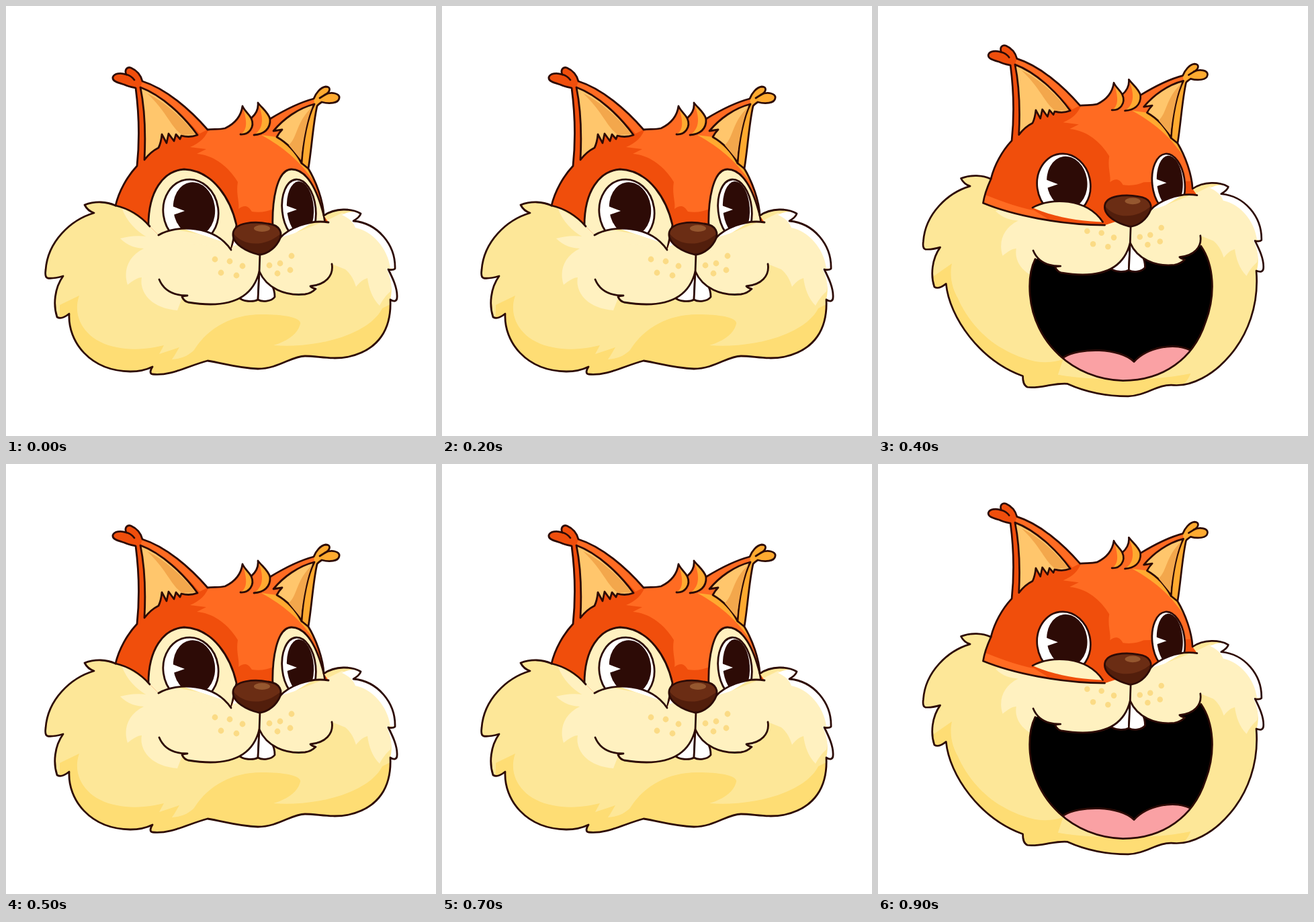
Write an HTML page that moves like this. It is 640x640 px and loops after 1000 ms.

```html
<!DOCTYPE html>
<html lang="en">
<head>
<meta charset="utf-8">
<title>Laughing squirrel</title>
<style>
  html, body { margin: 0; width: 100%; height: 100%; overflow: hidden; background: #fff; }
  svg { display: block; width: 100vw; height: 100vh; }
</style>
</head>
<body>
<svg id="stage" viewBox="0 0 640 640"></svg>
<script>
const INK = '#2d0b06', CREAM = '#fde798', PALE = '#fff1c0', GOLD = '#fedd74',
      RUST = '#f04e0c', ORANGE = '#ff6b22', AMBER = '#ffaa30', TAN = '#ffc66c', SHADE = '#f3a74c';

const fill = (d, color) => `<path d="${d}" fill="${color}"/>`;
const line = d => `<path d="${d}" fill="none" stroke="${INK}"/>`;
const both = (d, color) => `<path d="${d}" fill="${color}" stroke="${INK}"/>`;
const oval = (x, y, rx, ry, color, turn = 0, stroke = 'none') =>
  `<ellipse cx="${x}" cy="${y}" rx="${rx}" ry="${ry}" fill="${color}" stroke="${stroke}" transform="rotate(${turn} ${x} ${y})"/>`;
const clipped = (id, d, inner) =>
  `<clipPath id="${id}"><path d="${d}"/></clipPath><g clip-path="url(#${id})">${inner}</g>`;

const headTop = `M163,297 C168,276 180,254 195,238 C199,200 198,160 193,122
  C188,121 182,120 176,117 C166,114 158,112 159,106 C161,100 171,99 179,102
  C176,95 180,90 186,92 C195,96 201,104 203,112 C238,123 274,154 300,184
  C310,183 317,184 326,182 C343,174 350,163 352,149 C355,156 361,160 365,167
  C373,160 376,153 375,144 C381,152 390,158 393,168 C411,157 435,144 458,138
  C461,130 468,121 476,120 C484,120 483,128 475,132 C484,127 497,130 496,137
  C495,145 481,146 470,143 C467,145 464,147 463,149 C457,175 455,212 450,242
  C462,262 472,290 473,312`;
const leftLid = 'M227,341 C255,325 310,326 335,363';
const rightLid = 'M480,322 C450,317 420,332 408,345';
const jaw = 'M338,368 C268,367 197,353 151,334 C153,320 158,308 163,297';
const brow = 'M214,328 C200,312 185,302 163,297';
const lip = `M228,407 C235,424 250,431 270,431 C266,431 263,432 262,433
  C264,437 267,440 271,441 C325,450 366,440 377,395 C388,420 415,432 445,429
  C452,428 457,425 461,421 C457,420 454,419 453,417 C475,415 488,402 485,384`;
const mouth = `M486,400 C506,429 509,475 493,517 C475,573 428,607 366,607
  C289,605 229,548 223,475 C221,449 225,432 231,420`;

const cheekLeft = `M163,297 C150,291 133,290 117,296 C120,302 125,306 131,308
  C97,318 62,350 59,393 C58,400 59,404 62,405 C70,406 78,404 85,402
  C72,420 70,445 76,463 C82,467 89,462 94,458`;
const cheekRight = `C578,441 582,439 582,434 C583,420 575,404 569,392
  C573,393 577,393 579,391 C580,355 553,323 517,320 C522,317 527,313 528,309
  C515,301 490,300 473,312`;
const chin = {
  shut: `C92,500 125,543 185,544 C198,544 210,541 218,537 C214,543 214,547 218,548
    C245,551 270,536 300,528 C325,532 345,539 375,540 C405,540 425,521 445,521
    C465,521 485,527 510,522 C555,512 574,480 572,437`,
  open: `C99,510 146,576 212,600 C212,608 213,614 219,617 C237,620 260,610 281,612
    C310,625 341,631 374,631 C403,630 418,612 444,614 C498,618 580,545 571,438`
};
const chinShade = {
  shut: `M80,445 L109,431 C97,465 120,500 165,508 C185,512 205,512 235,505
    L228,518 L258,508 C254,515 251,520 247,526 C262,525 272,520 280,512
    C300,480 335,459 380,459 C415,459 440,464 438,473 C434,490 415,500 398,505
    C460,510 540,490 560,450 L600,430 V560 H80z`,
  open: `M70,450 L103,427 C98,450 106,470 112,480 C133,527 172,562 225,576
    C240,580 255,580 274,574 L266,598 C310,606 400,610 470,596
    C465,610 455,616 450,620 V640 H70z`
};

const freckles = [[311, 377], [333, 380], [352, 387], [320, 397], [343, 401],
                  [425, 372], [408, 383], [423, 393], [404, 398], [392, 386]]
  .map(([x, y]) => oval(x, y, 4.4, 4.4, '#fbdb85')).join('');

const fur = fill(`M172,300 C180,322 195,335 208,343 C195,341 182,343 170,346
    C182,358 194,360 205,361 C182,372 174,394 181,415 C190,408 196,404 202,404
    C198,425 215,450 255,453 L262,435 340,440 340,350 214,325z`, PALE)
  + fill(`M380,400 L400,350 480,318 500,308 C540,320 575,350 579,391 L572,425
    C566,430 560,438 556,446 C545,435 540,420 538,405 C530,407 525,413 521,418
    C517,405 512,398 505,392 L485,384 460,425z`, PALE)
  + fill(`M500,311 C512,304 522,306 528,309 L517,320 C553,323 580,355 579,391
    L572,390 C568,360 545,335 520,330 C518,324 512,316 500,311z`, '#fff')
  + fill('M569,392 C575,404 583,420 582,440 L572,437 C576,420 573,405 566,390z', '#fff');

const teeth = both('M377,395 C367,412 357,424 347,434 C352,440 368,441 375,437z', '#fff')
  + both('M377,395 L375,437 C381,441 395,440 400,433 C400,415 390,408 377,395z', '#fff');

const leftEar = `M200,121 C232,133 264,163 285,192 C277,195 268,195 261,193 L259,198
  253,191 250,201 242,190 239,204 232,191 C231,201 229,207 227,211
  C219,215 212,221 206,229 C208,190 207,155 200,121z`;
const rightEar = `M459,146 C435,152 413,168 398,186 L411,184 C407,188 405,191 403,195
  C419,204 431,217 440,234 C442,200 449,165 459,146z`;

const coat = fill(`M303,180 C298,196 288,204 274,210 L298,213 284,220
    C310,222 332,240 345,262 C342,280 348,292 346,302 C354,296 360,296 366,306
    C378,308 388,306 398,302 L480,300 460,240 430,200 400,180 394,160 375,140 350,145 325,180z`, ORANGE)
  + fill('M203,112 C238,123 274,154 300,184 L288,190 C264,163 232,133 200,121z', ORANGE)
  + fill('M393,168 C411,157 435,144 458,138 L459,146 C435,152 413,168 398,186z', ORANGE)
  + fill(`M458,138 C461,130 468,121 476,118 L500,130 490,148 463,149
    C457,175 455,212 450,242 L440,234 C442,200 449,165 459,146z`, AMBER)
  + fill('M380,192 L403,195 C419,204 431,217 440,234 L450,242 464,270 C444,238 420,214 380,192z', AMBER)
  + fill('M352,149 C355,156 361,160 365,167 C371,181 361,192 349,191 C361,184 358,168 352,149z', AMBER)
  + fill('M375,144 C381,152 390,158 393,168 C394,184 383,191 369,192 C385,182 383,164 375,144z', AMBER)
  + fill('M151,320 C185,334 210,342 229,345 L250,358 150,345z', ORANGE)
  + both(leftEar, TAN)
  + fill('M210,130 C236,142 264,168 282,191 L262,192 C245,180 240,158 210,130z', SHADE)
  + both(rightEar, TAN)
  + fill('M456,150 C448,168 442,200 439,229 L421,207 C434,195 432,172 456,150z', SHADE)
  + line('M365,167 C371,181 361,192 349,191')
  + line('M393,168 C394,184 383,191 369,192')
  + line('M440,234 L450,242')
  + line('M179,102 C184,103 188,106 191,110')
  + line('M475,132 L467,137');

const sockets = both('M212,330 C211,275 235,245 265,243 C310,245 335,290 343,326 L335,363 212,345z', PALE)
  + both('M398,350 C393,285 405,243 425,243 C447,243 463,272 473,312 L480,350z', PALE);

const eyes = oval(275, 306, 41, 48, '#fff', -8, INK)
  + oval(280, 302, 31, 40, INK, -8)
  + fill('M240,295 L266,305 240,314z', '#fff')
  + oval(436, 303, 25, 45, '#fff', -6, INK)
  + oval(438, 301, 20, 40, INK, -4)
  + fill('M414,296 L433,303 413,310z', '#fff');

const nosePath = `M338,338 C340,322 370,320 390,324 C408,326 413,338 406,350
  C398,364 385,370 376,370 C360,366 336,355 338,338z`;
const nose = fill(nosePath, '#6b2d14')
  + clipped('nose', nosePath, fill('M334,332 C348,358 385,362 412,336 V374 H334z', '#521e0c'))
  + oval(381, 331, 12, 5, '#95572f')
  + line(nosePath);

function face(pose) {
  const open = pose === 'open';
  const body = cheekLeft + chin[pose] + cheekRight;
  const head = headTop + rightLid.replace('M', 'L')
    + (open ? ' L378,355 ' + jaw.replace('M', 'L')
            : ' L345,335 335,363 C310,326 255,325 227,341 ' + brow.replace('M', 'L')) + 'z';
  const gape = fill(mouth + 'z', '#000')
    + clipped('mouth', mouth + 'z', both('M275,571 C299,556 361,556 383,578 C403,556 444,548 469,560 L480,640 H260z', '#faa1a4'))
    + line(mouth);
  return `<g id="${pose}" stroke-width="2.8" stroke-linejoin="round" stroke-linecap="round"
      ${open ? 'transform="translate(10.3 -30) scale(.968)"' : ''}>`
    + fill(body + 'L378,370z', CREAM)
    + clipped('body-' + pose, body + 'L378,370z', fill(chinShade[pose], GOLD) + fur)
    + line(body)
    + (open ? gape : '')
    + teeth
    + fill(lip + ' L480,322 408,345 378,335 335,360 240,350z', PALE)
    + line(lip) + line('M378,368 L377,396') + freckles
    + fill(head, RUST)
    + clipped('head-' + pose, head, coat + (open ? '' : sockets) + eyes)
    + (open ? fill(leftLid + ' C300,362 260,356 227,341z', PALE) : '')
    + line(headTop) + line(open ? jaw : brow) + line(leftLid) + line(rightLid)
    + nose.replaceAll('nose', 'nose-' + pose)
    + '</g>';
}

const stage = document.getElementById('stage');
stage.innerHTML = face('shut') + face('open');
const [shutFace, openFace] = ['shut', 'open'].map(id => document.getElementById(id));

// Each half-second beat ends with a 100 ms laugh.
function draw(now) {
  const laughing = now % 500 >= 400;
  shutFace.style.visibility = laughing ? 'hidden' : 'visible';
  openFace.style.visibility = laughing ? 'visible' : 'hidden';
  requestAnimationFrame(draw);
}
draw(performance.now());
</script>
</body>
</html>
```
